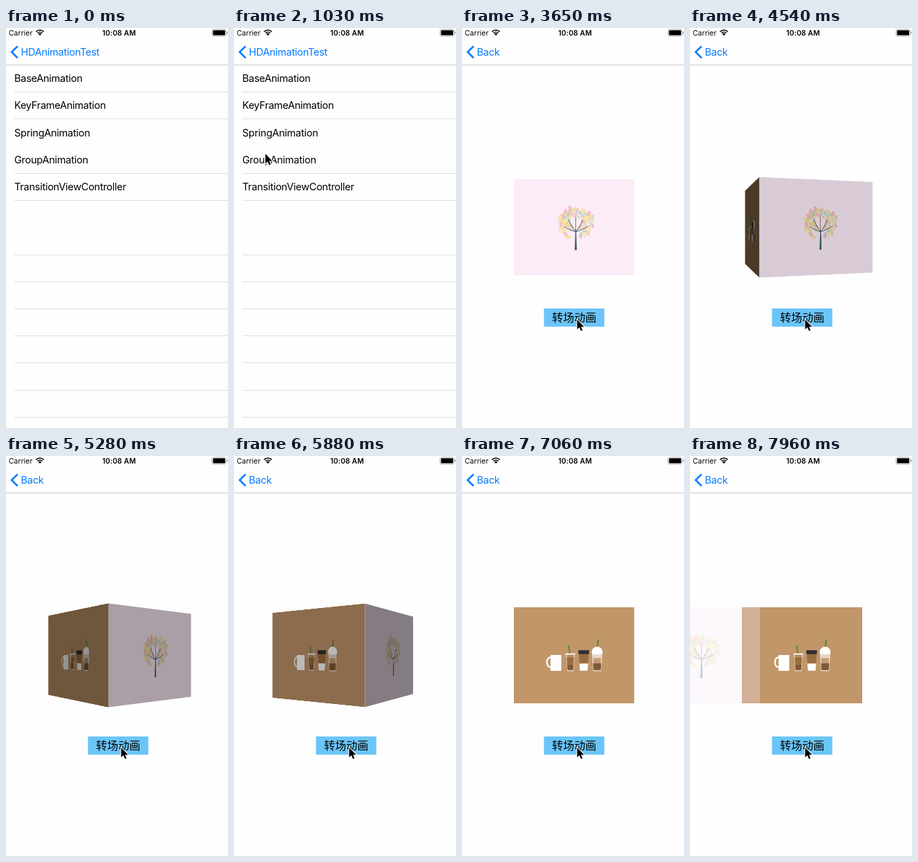
These frames come from a looping animation (321x579 px, 8 s). An HTML page with a canvas:

```html
<!DOCTYPE html>
<html lang="en">
<head>
<meta charset="utf-8">
<title>Layer transitions</title>
<style>
html, body { margin: 0; width: 100%; height: 100%; overflow: hidden; background: #fefefe; }
canvas { display: block; width: 321px; height: 579px; }
</style>
</head>
<body>
<canvas id="stage"></canvas>
<script>
const W = 321, H = 579, LOOP = 8000;
const STEP = 147.3, LEAD = 35;
const BLUE = '#007aff', PAGE = '#fefefe';
const SANS = 'Inter, "Open Sans", sans-serif', BODY = '14.55px ' + SANS, TIGHT = -0.27;
const CARD = { x: 75, y: 219, w: 174, h: 139 };
const ROWS = ['BaseAnimation', 'KeyFrameAnimation', 'SpringAnimation', 'GroupAnimation', 'TransitionViewController'];

// Pointer waypoints, each reached with an ease-out.
const PATH = [
  { t: 400, x: 191, y: 513 },
  { t: 920, x: 39, y: 161 },
  { t: 1473, x: 59.5, y: 229 },
  { t: 2510, x: 59.5, y: 229 },
  { t: 3240, x: 214, y: 442 },
  { t: 3660, x: 166.5, y: 422 }
];

const stage = document.getElementById('stage');
const dpr = window.devicePixelRatio || 1;
stage.width = W * dpr;
stage.height = H * dpr;
const ctx = stage.getContext('2d');
ctx.scale(dpr, dpr);

const clamp = v => Math.max(0, Math.min(1, v));
const mix = (a, b, p) => a + (b - a) * p;

function pointerAt(t) {
  const i = Math.max(1, PATH.findLastIndex(k => k.t <= t) + 1);
  const a = PATH[i - 1], b = PATH[i] || a;
  const p = a === b ? 0 : Math.sin(clamp((t - a.t) / (b.t - a.t)) * Math.PI / 2);
  return [mix(a.x, b.x, p), mix(a.y, b.y, p)];
}

function seeded(s) {
  return () => (s = (s * 16807) % 2147483647) / 2147483647;
}

function poly(g, pts, fill, stroke, width = 1) {
  g.beginPath();
  for (let i = 0; i < pts.length; i += 2) g.lineTo(pts[i], pts[i + 1]);
  if (fill) {
    g.closePath();
    g.fillStyle = fill;
    g.fill();
  }
  if (stroke) {
    g.strokeStyle = stroke;
    g.lineWidth = width;
    g.stroke();
  }
}

function label(str, x, y, font, color = '#000', spacing = 0, align = 'left') {
  ctx.font = font;
  ctx.letterSpacing = spacing + 'px';
  ctx.textAlign = align;
  ctx.fillStyle = color;
  ctx.fillText(str, x, y);
}

function makeCard(color, paint) {
  const scale = 2, c = document.createElement('canvas');
  c.width = CARD.w * scale;
  c.height = CARD.h * scale;
  const g = c.getContext('2d');
  g.scale(scale, scale);
  g.fillStyle = color;
  g.fillRect(0, 0, CARD.w, CARD.h);
  g.lineCap = 'round';
  paint(g);
  return c;
}

function paintTree(g) {
  const rnd = seeded(77), cx = 89.5, count = 84;
  const hues = ['#f5e08a', '#f6e7a4', '#9ccdb9', '#f3aeb0', '#f0c795', '#b9d9c2', '#f4dd80'];
  for (let i = 0; i < count; i++) {
    const r = 26.5 * Math.sqrt((i + 8) / (count + 8)), a = i * 2.4;
    const x = cx + r * Math.cos(a) + rnd() * 2 - 1, y = 63.5 + r * Math.sin(a) * 0.85;
    const hue = hues[Math.floor(rnd() * hues.length)], tilt = rnd() * 3, size = 2.6 + rnd() * 1.7;
    if (rnd() < 0.14 || (y > 69 && Math.abs(x - cx) < 6)) continue;
    g.globalAlpha = 0.7;
    g.fillStyle = hue;
    g.beginPath();
    g.ellipse(x, y, size, size * 0.62, tilt, 0, 7);
    g.fill();
  }
  g.globalAlpha = 1;
  const bark = '#41666e';
  poly(g, [cx - 0.6, 72, cx + 0.5, 72, cx + 1.6, 102.5, cx - 1.6, 102.5], bark);
  for (let i = -2; i <= 2; i++) {
    const a = i * 0.62, x = cx + 17.5 * Math.sin(a), y = 75 - 20 * Math.cos(a);
    g.beginPath();
    g.moveTo(cx, 76);
    g.quadraticCurveTo(mix(cx, x, 0.6), mix(76, y, 0.4), x, y);
    g.strokeStyle = i ? bark : '#8a5e4c';
    g.lineWidth = 0.9;
    g.stroke();
  }
}

// Returns a painter for bands of a tapering cup; a and b run from 0 (rim) to 1 (base).
function taper(g, cx, top, rim, base) {
  const bottom = 91.8;
  return (a, b, fill, edge) => {
    const ra = mix(rim, base, a), rb = mix(rim, base, b);
    const ya = mix(top, bottom, a), yb = mix(top, bottom, b);
    poly(g, [cx - ra, ya, cx + ra, ya, cx + rb, yb, cx - rb, yb], fill, edge, 0.9);
  };
}

function paintCups(g) {
  const white = '#fff', dark = '#805a36', mid = '#9a6d40';
  const straw = (x, y) => poly(g, [x, y, x + 1.5, y + 11], null, '#35803c', 1.4);

  g.strokeStyle = g.fillStyle = white;
  g.lineWidth = 2.2;
  g.beginPath();
  g.ellipse(53, 79.5, 5.2, 7.2, 0, 0, 7);
  g.stroke();
  g.fillRect(53, 69, 15.5, 23);

  straw(79.3, 56);
  const iced = taper(g, 81.6, 68, 5.8, 4);
  iced(0, 1, '#b58a5f', white);
  iced(0.2, 0.64, mid);
  iced(0.64, 0.96, dark);
  poly(g, [74.8, 67.4, 88.4, 67.4], null, white, 1.4);

  const paper = taper(g, 101, 67.5, 7.4, 5.4);
  paper(0, 1, white);
  paper(0, 0.57, mid);
  paper(-0.22, 0.01, '#2f2f31');

  poly(g, [120.7, 58, 122, 47.5], null, '#35803c', 1.5);
  const shake = taper(g, 120.4, 68, 6.8, 5.2);
  shake(0, 1, '#c39d76', white);
  shake(0, 0.23, '#e6d8c7');
  shake(0.55, 0.96, dark);
  g.fillStyle = white;
  g.beginPath();
  g.arc(120.4, 64.8, 7.8, 2.75, 0.4);
  g.fill();
}

const tree = makeCard('#fcecf7', paintTree);
const cups = makeCard('#c19669', paintCups);

function drawCard(img, dx = 0) {
  ctx.drawImage(img, CARD.x + dx, CARD.y, CARD.w, CARD.h);
}

// One cube side as perspective columns; ends are [x, z], dim is the shade.
function drawSide(img, [x0, z0], [x1, z1], dim) {
  const D = 466, cx = CARD.x + CARD.w / 2, cy = CARD.y + CARD.h / 2;
  const dx = x1 - x0, dz = z1 - z0;
  const left = cx + x0 * D / (D - z0), right = cx + x1 * D / (D - z1);
  const at = x => {
    const q = x - cx;
    return clamp((q * (D - z0) - D * x0) / (D * dx + q * dz));
  };
  if (right - left < 0.3) return;
  ctx.fillStyle = `rgba(0,0,0,${dim})`;
  for (let x = left; x < right;) {
    const next = Math.min(right, Math.floor(x) + 1);
    const u = at(x), v = at(next);
    const h = CARD.h * D / (D - z0 - (u + v) / 2 * dz);
    ctx.drawImage(img, u * img.width, 0, Math.max(0.01, (v - u) * img.width), img.height,
      x, cy - h / 2, next - x, h);
    ctx.fillRect(x, cy - h / 2, next - x, h);
    x = next;
  }
}

function drawCube(p) {
  const a = CARD.w / 2, c = Math.cos(p * Math.PI / 2), s = Math.sin(p * Math.PI / 2);
  const near = [a * (s - c), a * (c + s - 1)];
  drawSide(cups, [-a * (c + s), a * (s - c - 1)], near, 0.75 * (1 - p));
  drawSide(tree, near, [a * (c + s), a * (c - s - 1)], 0.75 * p);
}

function drawStatus() {
  label('Carrier', 4, 10.7, '10.3px ' + SANS, '#000', 0.1);
  label('10:08 AM', 163.6, 10.7, '600 10.3px ' + SANS, '#000', 0.15, 'center');
  const fan = r => {
    ctx.beginPath();
    ctx.arc(49, 10.9, r, -Math.PI * 0.75, -Math.PI * 0.25);
  };
  ctx.strokeStyle = ctx.fillStyle = '#000';
  ctx.lineWidth = 1.7;
  for (const r of [4.9, 7.9]) {
    fan(r);
    ctx.stroke();
  }
  fan(3.2);
  ctx.lineTo(49, 10.9);
  ctx.fill();

  ctx.beginPath();
  ctx.roundRect(299.3, 3.2, 17.6, 7.4, 1.4);
  ctx.fill();
  ctx.strokeStyle = ctx.fillStyle = '#9a9a9a';
  ctx.lineWidth = 0.8;
  ctx.beginPath();
  ctx.roundRect(297.9, 1.9, 20.4, 10, 2.5);
  ctx.stroke();
  ctx.fillRect(319.3, 5.2, 1.2, 3.4);
}

function drawNav(push) {
  const p = clamp(push * 1.02);
  ctx.fillStyle = PAGE;
  ctx.fillRect(0, 0, W, 53);
  ctx.fillStyle = '#c9c9cb';
  ctx.fillRect(0, 53, W, 1);
  poly(ctx, [16.8, 26.3, 8.2, 34.8, 16.8, 43.3], null, BLUE, 2.6);
  ctx.globalAlpha = 1 - p;
  label('HDAnimationTest', 21.5 - 40 * p, 40, BODY, BLUE, TIGHT);
  ctx.globalAlpha = p;
  label('Back', 21.5 + 60 * (1 - p), 40, BODY, BLUE, TIGHT);
  ctx.globalAlpha = 1;
}

function drawTable(push) {
  const dx = -0.3 * W * push;
  if (push > 0) {
    ctx.fillStyle = `rgba(0,0,0,${0.15 * (1 - push)})`;
    ctx.fillRect(dx, 210, W, 40);
  }
  ROWS.forEach((s, i) => label(s, dx + 12, 78 + 39.25 * i, BODY, '#000', TIGHT));
  ctx.fillStyle = '#dededf';
  for (let k = 1; k < 14; k++) {
    if (k !== 3 && k !== 6) ctx.fillRect(dx + 12, Math.floor(53.54 + 39.21 * k), W, 1);
  }
  ctx.fillStyle = `rgba(0,0,0,${0.1 * push})`;
  ctx.fillRect(0, 53, W, H);
}

function drawDetail(t, dx) {
  ctx.save();
  ctx.translate(dx, 0);
  ctx.fillStyle = PAGE;
  ctx.fillRect(0, 53, W, H);

  const spin = clamp((t - 4028) / 2945);
  if (spin === 0) drawCard(tree);
  else if (spin < 1) drawCube(spin);
  else drawCard(cups);

  const slide = clamp((t - 7660) / 1960);
  if (slide > 0) {
    ctx.globalAlpha = clamp(slide * 2.1);
    drawCard(tree, -CARD.w * (1 - slide));
    ctx.globalAlpha = 1;
  }

  ctx.fillStyle = '#6bc5f8';
  ctx.fillRect(118.5, 406, 87.3, 26.4);
  label('转场动画', 162.2, 425, '16px "Noto Sans CJK SC", "Noto Sans CJK", "Noto Sans CJK JP", sans-serif', '#000', 0, 'center');
  ctx.restore();
}

function drawPointer(x, y) {
  ctx.save();
  ctx.translate(x, y);
  ctx.lineJoin = 'round';
  const arrow = [0, 0, 0, 14.2, 3.2, 11.3, 5.6, 16.4, 7.8, 15.4, 5.5, 10.4, 10, 10.4];
  poly(ctx, arrow, '#fff', '#fff', 2);
  poly(ctx, arrow, '#000');
  ctx.restore();
}

// Critically damped spring of the page push.
function pushAt(t) {
  const k = Math.max(0, t - 1841) * 0.01826;
  const p = 1 - (1 + k) * Math.exp(-k);
  return p > 0.998 ? 1 : p;
}

function draw(now) {
  const t = Math.floor((now % LOOP + LEAD) / STEP) * STEP;
  const push = pushAt(t);
  ctx.fillStyle = PAGE;
  ctx.fillRect(0, 0, W, H);
  if (push < 1) drawTable(push);
  if (push > 0) drawDetail(t, W * (1 - push));
  drawNav(push);
  drawStatus();
  if (t > 0) drawPointer(...pointerAt(t));
}

const begin = performance.now();
function tick() {
  draw(performance.now() - begin);
  requestAnimationFrame(tick);
}
tick();
</script>
</body>
</html>
```
